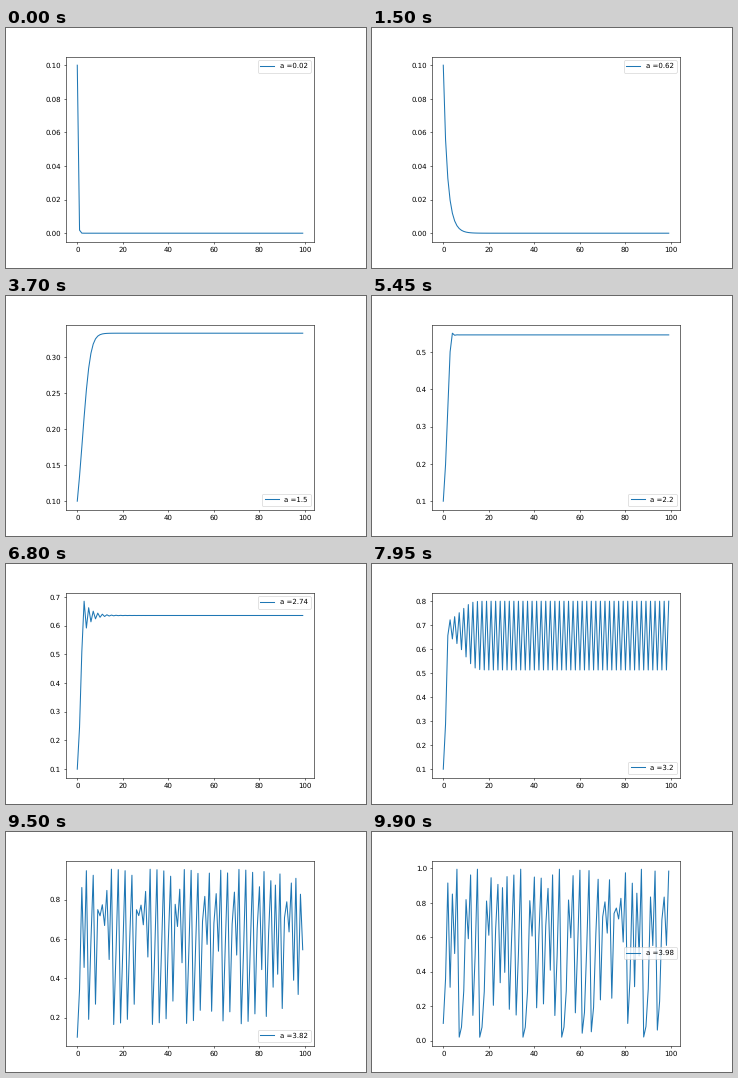
Recreate the animation shown at these times as a matplotlib script. Size 360 by 240 pixels, loop 9.95 s.

```python
import matplotlib.pyplot as plt
from matplotlib.animation import FuncAnimation

STEPS = 100
FRAMES = 199
START = 0.1

plt.rcParams["font.family"] = "DejaVu Sans"
plt.rcParams["text.hinting"] = "none"


def logistic(a):
    """Orbit of the logistic map x -> a x (1 - x)."""
    xs = [START]
    for _ in range(STEPS - 1):
        xs.append(a * xs[-1] * (1 - xs[-1]))
    return xs


fig = plt.figure(figsize=(7.2, 4.8), dpi=50)
# A 4:3 plot centred on the wider stage
ax = fig.add_axes([60 / 360, 0.11, 248 / 360, 0.77])
line, = ax.plot(range(STEPS), logistic(0.02), label="a =0.02")
legend = ax.legend(loc="best")


def update(i):
    a = (i + 1) / 50
    line.set_data(range(STEPS), logistic(a))
    legend.get_texts()[0].set_text(f"a ={a}")
    ax.relim()
    ax.autoscale_view()
    return line, legend


anim = FuncAnimation(fig, update, frames=FRAMES, init_func=lambda: update(0),
                     interval=50, repeat=True, repeat_delay=0)
plt.show()
```
